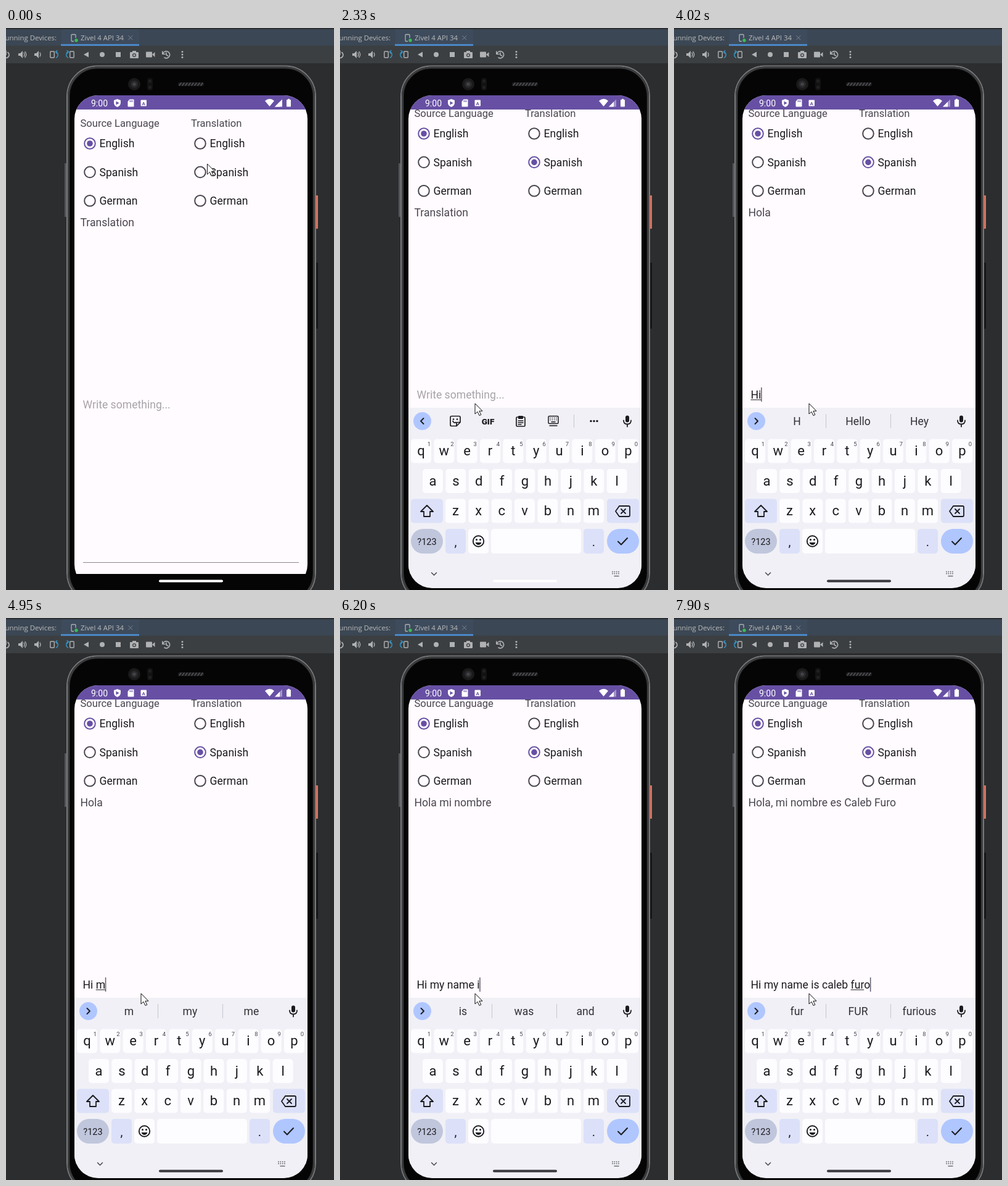
Write an HTML page that moves like this. It is 532 px wide and 910 px high and loops after 8000 ms.

```html
<!DOCTYPE html>
<html lang="en">
<head>
<meta charset="utf-8">
<title>Translator demo</title>
<style>
html, body { margin: 0; width: 100%; height: 100%; overflow: hidden; background: #2c2d2f; }
svg { display: block; width: 532px; height: 910px; }
text { font-family: Roboto, sans-serif; white-space: pre; }
.ide { font: 11.4px "Open Sans", "Noto Sans", sans-serif; fill: #bbb; }
.line { fill: none; stroke-linecap: round; stroke-linejoin: round; }
</style>
</head>
<body>
<svg id="stage" viewBox="0 0 532 910" xmlns="http://www.w3.org/2000/svg"></svg>
<script>
const LOOP = 8000;
const INK = '#1b1b1f', PURPLE = '#6750a4', GREY = '#49454f', ICON = '#afb1b3', BLUE = '#3592c4';

const rect = (x, y, w, h, fill, r = 0, more = '') =>
  `<rect x="${x}" y="${y}" width="${w}" height="${h}" rx="${r}" fill="${fill}" ${more}/>`;
const circle = (x, y, r, fill, more = '') => `<circle cx="${x}" cy="${y}" r="${r}" fill="${fill}" ${more}/>`;
const shape = (d, fill, more = '') => `<path d="${d}" fill="${fill}" ${more}/>`;
const line = (d, stroke, w = 1.5, more = '') =>
  `<path class="line" d="${d}" stroke="${stroke}" stroke-width="${w}" ${more}/>`;
const label = (x, y, size, fill, str, more = '') =>
  `<text x="${x}" y="${y}" font-size="${size}" fill="${fill}" ${more}>${str}</text>`;
const at = (x, y, body, more = '') => `<g transform="translate(${x} ${y})" ${more}>${body}</g>`;
const MID = 'text-anchor="middle"';

function ideBars() {
  const speaker = shape('M-6-2h3l4-4v12l-4-4h-3z', ICON);
  const turned = flip => `<g transform="scale(${flip} 1)">` +
    rect(-6.2, -5, 6.5, 10, 'none', 1, `stroke="${ICON}" stroke-width="1.4"`) +
    line('M2.5-4.5C7-4 7.5 3 3.5 5M5-6.5L2.3-4.5 4.5-2', BLUE, 1.5) + '</g>';
  return rect(0, 0, 532, 29, '#3b4754') + rect(0, 0, 532, 2, '#2b2d30') +
    rect(90, 2, 126, 25, '#3d4b5c') + rect(0, 28.5, 532, 28.5, '#3c3f41') + rect(89, 26, 127, 3, '#4a88c7') +
    '<text class="ide" x="82" y="20" text-anchor="end">Running Devices:</text>' +
    '<text class="ide" x="121" y="20">Zivel 4 API 34</text>' +
    rect(106, 10.5, 7, 11, 'none', 1, `stroke="${ICON}" stroke-width="1.3"`) +
    rect(110, 16, 7, 7, '#3d4b5c') + circle(114, 20, 2.7, '#3dbd55') +
    line('M198.5 12.5l6.5 6.5m0-6.5l-6.5 6.5', '#7d858d', 1) +
    at(0, 43, line('M3-3.5A5 5 0 1 1-3-3.5M0-6V0', ICON, 1.7)) +
    at(26, 43, speaker + line('M3-3Q5 0 3 3M5-4.5Q8.5 0 5 4.5', ICON, 1.3)) +
    at(52, 43, speaker + line('M3-3Q5 0 3 3', ICON, 1.3)) +
    at(78, 43, turned(1)) + at(104, 43, turned(-1)) +
    shape('M126 43l8-4.5v9z', ICON) + circle(156, 43, 4, ICON) + rect(178, 39, 8, 8, ICON) +
    at(208, 43, rect(-7, -4, 14, 10, ICON, 1) + rect(-3, -6, 6, 3, ICON) +
      circle(0, 1, 3, '#3c3f41') + circle(0, 1, 1.7, ICON)) +
    at(234, 43, rect(-7, -4.5, 10, 9, ICON, 1) + shape('M3 0l4.5-4v8z', ICON)) +
    at(260, 43, line('M-5.5-1A5.6 5.6 0 1 1-3 5M-6.2-5v4.2h4.2M0-3V.5l2.5 1.5', ICON, 1.6)) +
    [-4.5, 0, 4.5].map(d => circle(286, 43 + d, 1.5, ICON)).join('');
}

function phoneBody() {
  const hatch = [...Array(8)].map((_, i) => line(`M${281 + i * 5} 93l3-4`, '#55565a', 1.4)).join('');
  return rect(95, 219, 3, 87, '#55575a', 1) + rect(502, 271, 4, 54, '#df715c', 1) + rect(502, 380, 4, 107, '#151617', 1) +
    rect(98, 60.5, 405, 872, '#111', 50) +
    rect(99, 61.5, 403, 870, 'none', 49, 'stroke="#77797b" stroke-width="2"') +
    rect(101.5, 64, 398, 865, 'none', 46.5, 'stroke="#3b3c3e" stroke-width="3"') +
    rect(104, 66.5, 393, 860, '#050505', 44) +
    circle(208, 91, 10, '#1a1a1b') + circle(208, 91, 6, '#29292c') + circle(208, 91, 2.8, '#424247') +
    rect(229, 81, 9, 20, '#121213', 4) + circle(233.5, 86, 2.6, '#202022') + circle(233.5, 96, 2.6, '#202022') +
    rect(279, 88, 42, 6, '#1d1d1f', 3) + hatch;
}

function statusBar() {
  return rect(111, 109, 378, 23, PURPLE) + label(138, 126.5, 14, '#fff', '9:00') +
    shape('M180.500 115l5.500 2v4q0 5-5.500 7-5.500-2-5.500-7v-4z', '#fff') + shape('M178.500 118.500l5 3-5 3z', PURPLE) +
    shape('M200.500 115.500h6q1 0 1 1v10q0 1-1 1h-8q-1 0-1-1v-7.500z', '#fff') +
    line('M201 117.500v2m2-2v2m2-2v2', PURPLE, 1) +
    rect(218.5, 116.500, 9.5, 10, '#fff', 1) +
    label(223.2, 124.5, 8, PURPLE, 'A', MID + ' font-weight="700"') +
    shape('M420 118q8-6.500 15 0l-7.500 9z', '#fff') +
    shape('M436 127.500l12-12v12z', '#fff', 'id="signal"') +
    shape('M436 127.500l8-8v8z', '#fff') +
    rect(455, 116, 7, 11.500, '#fff', 1) + rect(457, 114.800, 3, 2, '#fff');
}

function radios(x, name) {
  return ['English', 'Spanish', 'German'].map((lang, i) => {
    const y = 187 + i * 46.4;
    return circle(x, y, 8.8, 'none', `id="${name}ring${i}" stroke="${GREY}" stroke-width="2"`) +
      circle(x, y, 4.8, PURPLE, `id="${name}dot${i}"`) +
      label(x + 15.5, y + 6.3, 17.6, '#1c1b1f', lang);
  }).join('');
}

function appContent() {
  return label(120.5, 159.6, 16.6, GREY, 'Source Language') + label(300, 159.6, 16.6, GREY, 'Translation') +
    radios(136, 'from') + radios(315, 'to') +
    label(120.5, 321, 17.6, GREY, '', 'id="result"') +
    label(124.5, 616, 17.6, '#a7a4a9', 'Write something...', 'id="hint"') +
    label(124.5, 616, 17.6, '#1c1b1f', '', 'id="entry"') +
    rect(0, 617.5, 0, 1, '#1c1b1f', 0, 'id="under"') +
    rect(125, 598, 2, 23, '#625b71', 0, 'id="caret"') +
    rect(125, 865, 350, 1, '#8b898d', 0, 'id="field"');
}

function keyboard() {
  const WHITE = '#fdfcff', TINT = '#dce1f9', ACCENT = '#b0c6ff', PITCH = 37.33;
  const row = (keys, x0, y, base) => [...keys].map((k, i) => {
    const x = x0 + i * PITCH;
    return rect(x - 16.5, y, 33, 39, WHITE, 5) + label(x, base, 22, INK, k, MID) +
      (keys.length === 10 ? label(x + 13, 676.5, 9.5, '#45464f', (i + 1) % 10, MID) : '');
  }).join('');
  const keypad = at(346, 636.500, rect(-8, -8, 16, 12, 'none', 1.5, `stroke="${INK}" stroke-width="1.5"`) +
    line('M-5-5h10M-5-2h10', INK, 1.600, 'stroke-dasharray="0.100 3.200"') + line('M-3 1.300h6M-6 7.500h12', INK, 1.400));
  const tools = at(187, 636.500,
      line('M-6-8h12q2 0 2 2v8l-6 6h-8q-2 0-2-2v-12q0-2 2-2zM8 2h-4q-2 0-2 2v4M-4 0q2 4 5 2', INK, 1.700) +
      circle(-3, -3, 1.3, INK) + circle(3, -3, 1.3, INK)) +
    label(240, 641.500, 13.5, INK, 'GIF', MID + ' font-weight="900"') +
    at(293, 637, rect(-7, -7, 14, 15, 'none', 1.5, `stroke="${INK}" stroke-width="1.700"`) +
      rect(-4, -9, 8, 5, INK, 1) + line('M-4-1h8M-4 2h8M-4 5h5', INK, 1.400)) + keypad +
    rect(379, 626, 1, 21, '#c6c6d0') + [-5, 0, 5].map(d => circle(412 + d, 636.500, 1.700, INK)).join('') +
    line('M135.500 632l-4.500 4.500 4.500 4.500', INK, 1.900);
  const words = [199.5, 298.5, 398].map((x, i) => label(x, 643, 17.6, '#303036', '', `id="word${i}" ${MID}`)).join('') +
    rect(246, 625, 1, 23, '#c6c6d0') + rect(351, 625, 1, 23, '#c6c6d0') +
    line('M131.500 632l4.500 4.500-4.500 4.500', INK, 1.900) +
    at(398.5, 637, shape('M-8-6h4l2-4h4l2 4h4q2 0 2 2v8q0 2-2 2h-4l-2 3h-4l-2-3h-4q-2 0-2-2v-8q0-2 2-2z', '#e5342b') +
      rect(-7.500, -3, 15, 6.500, '#fff', 1), 'id="badge"');
  return rect(111, 615, 378, 295, '#f0f0f6') + circle(133.5, 636.5, 14.5, ACCENT) +
    `<g id="tools">${tools}</g><g id="words">${words}</g>` +
    at(466, 636.500, rect(-3, -9, 6, 11, INK, 3) + line('M-6-1q0 6 6 6t6-6M0 5v4', INK, 1.800)) +
    row('qwertyuiop', 131.5, 665.5, 692) + row('asdfghjkl', 150.5, 714, 740.500) + row('zxcvbnm', 187.5, 762.5, 789) +
    rect(115, 762.5, 52, 39, TINT, 5) + rect(433, 762.5, 52, 39, TINT, 5) +
    line('M141 773l-10 10h5v8h10v-8h5z', INK, 1.800) +
    line('M453 774h15q2 0 2 2v13q0 2-2 2h-15l-6-8.500zM456 779l7 7m0-7l-7 7', INK, 1.800) +
    rect(115, 811, 52, 40, '#c0c6dc', 20) + label(141, 836.500, 14.500, INK, '?123', MID) +
    rect(171, 811, 33, 40, TINT, 5) + label(187.5, 839, 20, INK, ',', MID) +
    rect(208, 811, 33, 40, WHITE, 5) +
    circle(224.500, 831, 8.700, 'none', `stroke="${INK}" stroke-width="1.900"`) +
    circle(221.500, 828.500, 1.500, INK) + circle(227.500, 828.500, 1.500, INK) +
    shape('M219.500 833h10q-1.500 4-5 4t-5-4z', INK) +
    rect(245, 811, 146, 40, WHITE, 5) + rect(395, 811, 33, 40, TINT, 5) + label(411.5, 839, 20, INK, '.', MID) +
    rect(433, 811, 52, 40, ACCENT, 20) + line('M451 831.500l5 5 10-10.500', INK, 2) +
    line('M148.500 882l4 4 4-4', '#45464f', 1.500) +
    line('M442 880.500h13M442 883.500h13', '#6b6c74', 1.800, 'stroke-dasharray="0.100 3.200"') +
    line('M445 887.500h7', '#6b6c74', 1.500);
}

const stage = document.getElementById('stage');
stage.innerHTML = '<clipPath id="screen"><rect x="111" y="109" width="378" height="798" rx="38"/></clipPath>' +
  rect(0, 0, 532, 910, '#2c2d2f') + phoneBody() + ideBars() +
  '<g clip-path="url(#screen)">' + rect(111, 109, 378, 775, '#fffbfe') +
  `<g id="content">${appContent()}</g>` + rect(111, 884, 378, 26, '#050505') + statusBar() +
  `<g id="keyboard">${keyboard()}</g>` + rect(248, 893.5, 104, 4, '#fff', 2, 'id="pill"') + '</g>' +
  shape('M0 0V17l4-3.700 3 6.200 2.800-1.300-3-6H12z', '#fff', 'id="pointer" stroke="#111" stroke-width="1" stroke-linejoin="round"');

const el = {};
stage.querySelectorAll('[id]').forEach(node => { el[node.id] = node; });
const set = (id, attrs) => { for (const k in attrs) el[id].setAttribute(k, attrs[k]); };
const show = (id, on) => set(id, { visibility: on ? 'inherit' : 'hidden' });

// Typing steps: time, typed text, underlined tail, translation, suggestions ("" keeps the previous value)
const FULL = 'Hi my name is caleb';
const TYPING = [
  [0, '', '', 'Translation', ''],
  [3750, 'H', '', '', ''],
  [3890, 'H', 'H', 'H', 'H|Hello|Hey'],
  [4020, 'Hi', 'Hi', 'Hola', ''],
  [4170, 'Hi ', 'Hi', '', 'Hi|Hit|His'],
  [4420, 'Hi ', '', '', ''],
  [4540, 'Hi ', '', '', 'there|guys|everyone'],
  [4810, 'Hi m', '', '', ''],
  [4930, 'Hi m', 'm', '', 'm|my|me'],
  [5060, 'Hi my', 'm', '', ''],
  [5180, 'Hi my ', 'my', 'Hola mi', 'my|mt|myself'],
  [5310, 'Hi my n', '', '', 'name|friend|mom'],
  [5440, 'Hi my na', 'n', 'Hola mi n', 'n|name|new'],
  [5570, 'Hi my nam', 'na', 'Hola mi na', 'na|name|*'],
  [5690, 'Hi my nam', 'nam', 'Hola mi nam', 'nam|name|*'],
  [5810, 'Hi my name', 'name', '', 'name|named|*'],
  [5960, 'Hi my name ', '', 'Hola mi nombre', 'is|was|and'],
  [6100, 'Hi my name i', '', '', ''],
  [6230, 'Hi my name is', 'i', '', 'i|is|in'],
  [6370, 'Hi my name is ', '', 'Hola, mi nombre es', 'the|not|a'],
  [6500, 'Hi my name is ca', 'c', '', 'c|can|call'],
  [6640, 'Hi my name is cale', 'cal', '', 'cal|call|Cal'],
  [6780, FULL, 'cale', 'Hola, mi nombre es Caleb', 'cale|Caleb|cal e'],
  [7060, FULL + ' ', '', '', ''],
  [7200, FULL + ' ', '', '', 'and I|from|and'],
  [7510, FULL + ' f', '', '', ''],
  [7640, FULL + ' fu', 'f', 'Hola, mi nombre es Caleb F', 'f|for|from'],
  [7770, FULL + ' fur', 'fu', 'Hola, mi nombre es Caleb Fu', 'fu|full|fun'],
  [7900, FULL + ' furo', 'fur', 'Hola, mi nombre es Caleb Furo', 'fur|FUR|furious'],
];
for (let i = 1; i < TYPING.length; i++)
  for (const k of [3, 4]) TYPING[i][k] = TYPING[i][k] || TYPING[i - 1][k];

// Pointer steps: time, x, y
const POINTER = [[0, 326.5, 220], [120, 328, 227], [830, 322, 262], [960, 292, 365], [1100, 254, 490],
  [1230, 228, 580], [1370, 219, 608]];
const latest = (steps, t) => steps.findLast(s => s[0] <= t);

function drawRadio(name, chosen) {
  for (let i = 0; i < 3; i++) {
    set(name + 'ring' + i, { stroke: i === chosen ? PURPLE : GREY });
    show(name + 'dot' + i, i === chosen);
  }
}

function drawTyping(t) {
  const [, typed, tail, result, suggestions] = latest(TYPING, t);
  el.entry.textContent = typed;
  el.result.textContent = result;
  show('hint', !typed);
  const left = 124.5;
  const width = n => n ? el.entry.getSubStringLength(0, n) : 0;
  const from = tail ? typed.lastIndexOf(' ', typed.trimEnd().length - 1) + 1 : 0;
  const start = width(from);
  set('under', { x: left + start, width: tail ? width(from + tail.length) - start : 0 });
  set('caret', { x: left + width(typed.length) - (typed ? 0.3 : -0.5), width: typed ? 1.5 : 2 });
  const words = suggestions.split('|');
  show('tools', !suggestions);
  show('words', suggestions);
  show('badge', words[2] === '*');
  for (let i = 0; i < 3; i++) el['word' + i].textContent = words[i] && words[i] !== '*' ? words[i] : '';
}

function draw(t) {
  const focused = t >= 1500, panned = t >= 2330;
  const [, px, py] = latest(POINTER, t);
  set('pointer', { transform: `translate(${px} ${py})` });
  drawRadio('from', 0);
  drawRadio('to', t >= 560 ? 1 : -1);
  set('field', { height: focused ? 2 : 1, fill: focused ? '#625b71' : '#8b898d' });
  show('caret', focused && !(t >= 2200 && t < 2470) && !(t >= 2920 && t < 3330));
  set('content', { transform: `translate(0 ${panned ? -16 : 0})` });
  show('keyboard', t >= 2200);
  set('keyboard', { transform: `translate(0 ${panned ? 0 : 100})` });
  set('signal', { 'fill-opacity': t >= 2200 ? 0.4 : 1 });
  set('pill', { fill: t >= 3330 ? '#3a3a3e' : '#fff' });
  drawTyping(t);
}

const begin = performance.now();
function tick() {
  draw((performance.now() - begin) % LOOP);
  requestAnimationFrame(tick);
}
tick();
</script>
</body>
</html>
```
